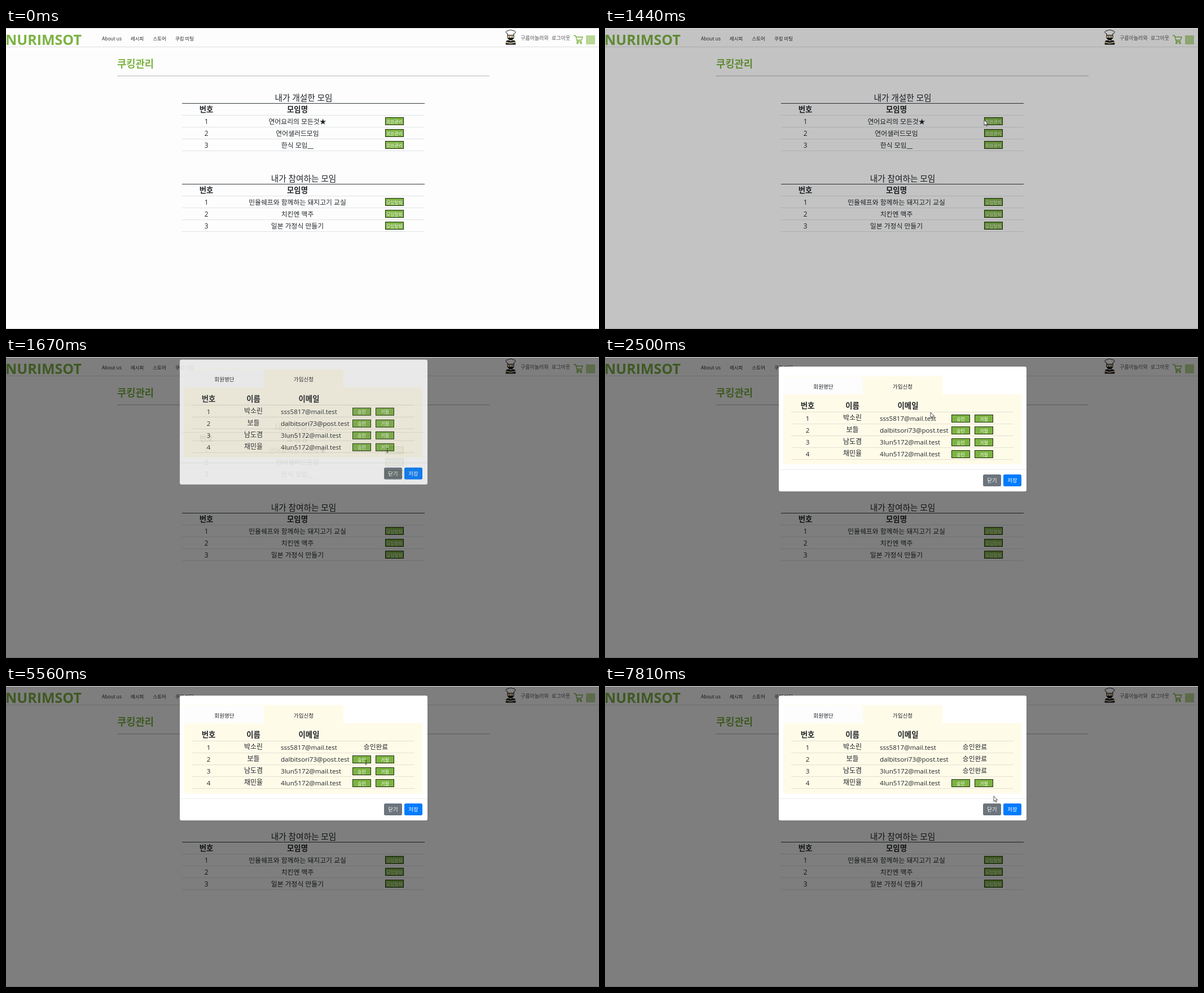
These frames come from a looping animation (1051 px wide and 533 px high, 8000 ms). An HTML page:

```html
<!DOCTYPE html>
<html lang="ko">
<head>
<meta charset="utf-8">
<title>쿠킹관리</title>
<style>
html, body { margin: 0; width: 100%; height: 100%; overflow: hidden; background: #fdfdfd; }
svg { display: block; font-family: "Open Sans", "Noto Sans CJK KR", "Noto Sans CJK JP", "Noto Sans CJK", sans-serif; }
text { white-space: pre; }
</style>
</head>
<body>
<svg id="stage" width="1051" height="533" viewBox="0 0 1051 533"></svg>
<script>
const GREEN = '#7cb342', INK = '#212529', RULE = '#dee2e6', CREAM = '#fffbe9';
const $ = id => document.getElementById(id);

// Text is placed by its vertical centre.
const text = (str, x, cy, size, { fill = INK, anchor = 'middle', weight = 400, id = '' } = {}) =>
  `<text id="${id}" x="${x}" y="${cy + size * 0.37}" font-size="${size}" fill="${fill}" text-anchor="${anchor}" font-weight="${weight}">${str}</text>`;
const rect = (x, y, w, h, fill, more = '') =>
  `<rect x="${x}" y="${y}" width="${w}" height="${h}" fill="${fill}" ${more}/>`;
const left = { anchor: 'start' }, bold = { weight: 700 };
const button = (label, x, y) =>
  rect(x + 0.5, y + 0.5, 32, 13, GREEN, 'stroke="#1d2b0c"') + text(label, x + 16.5, y + 7.8, 7.8, { fill: '#fff' });

function meetingTable(title, top, rows, label) {
  let out = text(title, 527.5, top - 9.5, 14.7) + rect(312, top, 430, 1, '#343a40') +
    text('번호', 355, top + 11, 13.4, bold) + text('모임명', 516.5, top + 11, 13.4, bold) +
    rect(312, top + 21, 430, 1, RULE);
  rows.forEach((name, i) => {
    const y = top + 21 * (i + 1);
    out += text(i + 1, 355, y + 11.5, 11.8) + text(name, 516.5, y + 11.3, 11.85) +
      button(label, 672, y + 4) + rect(312, y + 21, 430, 1, RULE);
  });
  return out;
}

const chef = `<g stroke="#111" stroke-width="1">
  <path d="M889 13v-3c-5-1-3-6 1-5 2-2 7-2 9 0 4-1 6 4 1 5v3z" fill="#fff"/>
  <path d="M889 13h11v5q-5 6-11 0z" fill="#f4dfb8"/>
  <path d="M890 18q2-1 4.500 0q2.500-1 4.500 0l-2 3h-5z" fill="#111"/>
  <path d="M886 29l1-6 4-1 3.500 2 3.500-2 4 1 1 6z" fill="#222"/>
  <path d="M885 25l9 2 10-2" fill="none" stroke="#f4dfb8" stroke-width="1.500"/>
</g><circle cx="892.500" cy="15.500" r=".8"/><circle cx="897" cy="15.500" r=".8"/>`;
const cart = `<g fill="none" stroke="${GREEN}" stroke-width="1.300">
  <path d="M1006 13.500h3.500l3 10.500h7.500M1010.500 16h11.500l-2 5.500h-8"/>
  <circle cx="1013" cy="26.500" r="1.300"/><circle cx="1019" cy="26.500" r="1.300"/></g>`;

const nav = [['About us', 170], ['레시피', 221], ['스토어', 260.500], ['쿠킹 미팅', 300]]
  .map(([s, x]) => text(s, x, 19, 8.4, { ...left, weight: 500 })).join('');

const page = rect(0, 0, 1051, 533, '#fdfdfd') +
  text('NURIMSOT', -1, 21, 25, { ...left, weight: 700, fill: GREEN }) + nav + chef + cart +
  text('구름아놀러와', 912, 18, 9, { ...left, fill: '#555' }) + text('로그아웃', 967, 18, 9, { ...left, fill: '#555' }) +
  rect(1028, 13, 16, 16, '#b9d795') +
  rect(0, 33, 1051, 1, '#ddd') + rect(0, 532, 1051, 1, '#d5d5d5') +
  text('쿠킹관리', 197, 63, 17.7, { ...left, weight: 700, fill: GREEN }) +
  rect(197, 84, 660, 1.5, '#ccc') +
  rect(312, 155, 430, 20, '#000', 'id="hover" fill-opacity=".075"') +
  meetingTable('내가 개설한 모임', 133, ['연어요리의 모든것★', '연어샐러드모임', '한식 모임__'], '회원관리') +
  meetingTable('내가 참여하는 모임', 276, ['민율쉐프와 함께하는 돼지고기 교실', '치킨엔 맥주', '일본 가정식 만들기'], '모임탈퇴');

const people = [['박소린', 'sss5817@mail.test'], ['보들', 'dalbitsori73@post.test'],
  ['남도겸', '3lun5172@mail.test'], ['채민율', '4lun5172@mail.test']];
const personRow = ([name, mail], i) => {
  const y = 97 + 21 * i;
  return text(i + 1, 359, y + 11.5, 11.6) + text(name, 438.500, y + 11, 12) + text(mail, 487, y + 11.5, 11.6, left) +
    `<g id="ask${i}">${button('승인', 614, y + 5)}${button('거절', 655, y + 5)}</g>` +
    text('승인완료', 655.500, y + 11, 11.8, { id: 'done' + i }) + rect(330, y + 21, 394, 1, '#e3e1d3');
};
const bigButton = (label, x, fill) =>
  rect(x, 208, 32, 21, fill, 'rx="2.500"') + text(label, x + 16, 218.5, 9.4, { fill: '#fff' });

const modal = `<g id="modal">` + rect(308, 17, 439, 221, '#fff', 'rx="3"') +
  rect(316, 33, 282, 4, '#fffdf3') + rect(316, 66, 422, 124, CREAM) +
  rect(316, 35, 141, 31, CREAM, 'id="tab0"') + rect(457, 35, 141, 31, CREAM, 'id="tab1"') +
  rect(456.500, 37, 141, 31, 'none', 'id="ring" stroke="#8fb4dc"') +
  text('회원명단', 387, 52, 9.6, { id: 'label0' }) + text('가입신청', 527.500, 52, 9.6, { id: 'label1' }) +
  text('번호', 359, 86.500, 13.4, bold) + text('이름', 438.500, 86.500, 13.4, bold) + text('이메일', 537, 86.500, 13.4, bold) +
  rect(330, 97, 394, 1, '#e3e1d3') + people.map(personRow).join('') +
  rect(308, 199, 439, 1, '#e9ecef') + bigButton('닫기', 670, '#6c757d') + bigButton('저장', 706, '#007bff') + '</g>';

const status = `<g id="status">` + rect(-0.500, 523.500, 171, 10, '#fff', 'stroke="#c8c8c8"') +
  text('', 1, 528.800, 6.4, { ...left, fill: '#666', id: 'url' }) + '</g>';

const cursors = `<g id="cursor" fill="#fff" stroke="#222" stroke-width=".8">
  <path id="arrow" d="M0 0v9.500l2.200-2 1.500 3.300 1.500-.7-1.500-3.200h3z"/>
  <path id="hand" d="M2.500 7V1q1-1.500 2 0v3.500l3.500.8q1.300.3 1.200 1.700l-.7 5.500H4L.4 8.300Q0 6.500 2.500 7z"/>
  <path id="beam" d="M-1.500 0h3M0 0v7M-1.500 7h3"/></g>`;

$('stage').innerHTML = page + rect(0, 0, 1051, 533, '#000', 'id="dim"') + modal + status +
  rect(0, 0, 1051, 1, '#d9d9d9') + cursors;

// Bursts of activity: start, end, number of steps; the picture rests between them.
const bursts = [[160, 310, 3], [480, 780, 5], [950, 1740, 11], [1810, 2270, 7], [2500, 3060, 8], [3450, 3760, 5],
  [3930, 4080, 3], [4400, 4780, 6], [5100, 5100, 1], [5260, 5560, 5], [5880, 6340, 7], [7120, 7580, 7], [7740, 7810, 2]];
function snap(t) {
  const burst = bursts.filter(b => b[0] <= t).pop();
  if (!burst) return 0;
  const [start, end, n] = burst;
  if (t >= end) return end;
  const step = (end - start) / (n - 1);
  return start + Math.floor((t - start) / step) * step;
}

// Cursor path: time, x, y.
const path = [[160, 836, 377], [310, 763, 255], [480, 757, 250], [780, 672, 163], [1500, 672, 163], [1660, 676, 162],
  [1810, 672, 160], [2270, 577, 98], [2500, 577, 98], [2900, 433, 42], [3450, 433, 42], [3760, 487, 50], [4400, 489, 50],
  [4620, 700, 92], [4780, 634, 99], [5260, 634, 99], [5560, 638, 132], [5880, 638, 132], [6340, 638, 137],
  [7120, 638, 137], [7580, 638, 147], [7740, 660, 172], [7810, 689, 195]];
function cursorAt(t) {
  const i = path.findIndex(p => p[0] > t);
  if (i < 0) return path[path.length - 1].slice(1);
  if (!i) return path[0].slice(1);
  const [t0, x0, y0] = path[i - 1], [t1, x1, y1] = path[i], k = (t - t0) / (t1 - t0);
  return [x0 + (x1 - x0) * k, y0 + (y1 - y0) * k];
}

const clamp = v => Math.max(0, Math.min(1, v));
const show = (id, on) => $(id).style.display = on ? '' : 'none';
const approvedAt = [5260, 6100, 7340, Infinity];

function draw(now) {
  const t = snap(now % 8000), [x, y] = cursorAt(t);
  const within = (a, b) => t >= a && t < b;

  show('hover', within(480, 1355) && x > 312 && x < 742 && y > 154 && y < 217);
  $('hover').setAttribute('y', 155 + 21 * Math.floor((y - 154) / 21));
  $('dim').setAttribute('opacity', 0.5 * clamp((t - 1355) / 150));

  const rest = 1 - clamp((t - 1536) / 300);
  $('modal').setAttribute('opacity', clamp((t - 1536) / 150));
  $('modal').setAttribute('transform', `translate(0 ${-36 * rest * rest})`);

  const members = within(2975, 4000);
  $('tab0').setAttribute('fill', members ? CREAM : '#fdfdfd');
  $('tab1').setAttribute('fill', members ? '#fdfdfd' : CREAM);
  show('ring', within(2900, 5100));
  $('ring').setAttribute('x', t < 3930 ? 316.5 : 456.5);
  const inTab = t > 2500 && y > 36 && y < 67;
  $('label0').setAttribute('fill', inTab && x > 316 && x < 457 ? '#2f78b7' : INK);
  $('label1').setAttribute('fill', inTab && x >= 457 && x < 598 ? '#2f78b7' : INK);
  approvedAt.forEach((at, i) => {
    show('ask' + i, !members && t < at);
    show('done' + i, !members && t >= at);
  });

  show('status', within(2800, 5260));
  $('url').textContent = 'localhost/nurimsot/meetup/manage.do?hostNo=606#' + (x < 457 ? 7 : 8);

  const kind = within(2800, 4450) ? 'hand' : within(1600, 1800) || within(5500, 7700) ? 'beam' : 'arrow';
  ['arrow', 'hand', 'beam'].forEach(k => show(k, k === kind));
  show('cursor', t >= 160);
  $('cursor').setAttribute('transform', `translate(${x} ${y})`);
}

let start;
function tick(now) {
  start ??= now;
  draw(now - start);
  requestAnimationFrame(tick);
}
draw(0);
requestAnimationFrame(tick);
</script>
</body>
</html>
```
